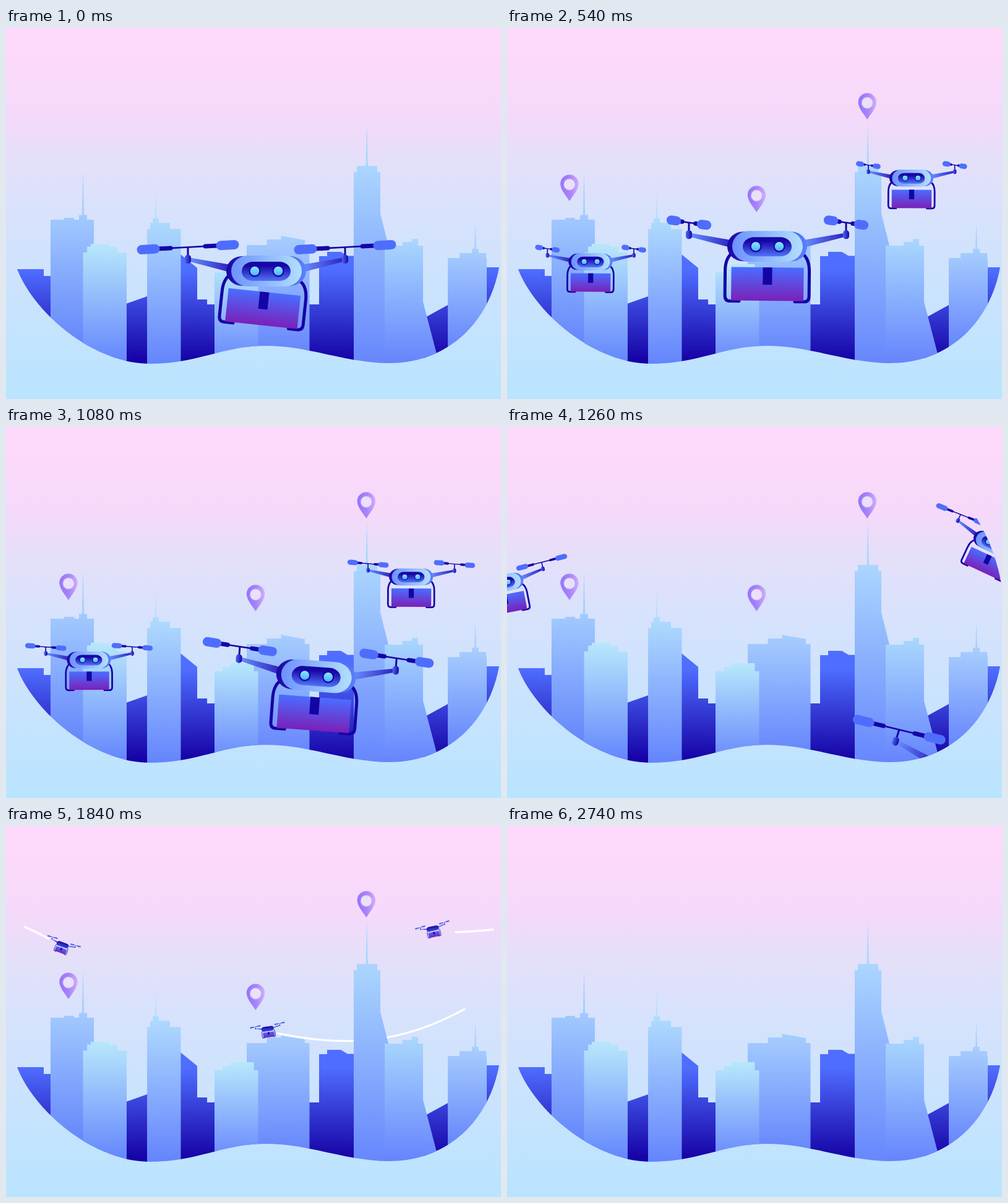
An HTML page that plays this animation: 800x600 px, repeating every 3 s.

```html
<!DOCTYPE html>
<html lang="en">
<head>
<meta charset="utf-8">
<title>Drone delivery</title>
<style>
  html, body { margin: 0; width: 100%; height: 100%; overflow: hidden; }
  svg { display: block; width: 100vw; height: 100vh; }
  .trail { fill: none; stroke: #fff; stroke-width: 3.2; stroke-linecap: round; }
  .rotor path { fill: none; stroke: #1504a5; }
  .rotor .rod { stroke-width: 2.6; }
  .rotor .grip { stroke-width: 7; stroke-linecap: round; }
  .rotor .blade { stroke: #4f6dfc; stroke-width: 15; stroke-linecap: round; }
  .frame { fill: none; stroke: #1504a5; stroke-width: 5; stroke-linecap: round; }
</style>
</head>
<body>
<svg id="stage" viewBox="0 0 800 600" preserveAspectRatio="none">
  <defs id="defs">
    <linearGradient id="sky" x2="0" y2="1">
      <stop offset="0" stop-color="#ffd9fb"/><stop offset=".24" stop-color="#f5d9fa"/>
      <stop offset=".34" stop-color="#e6dff9"/><stop offset=".5" stop-color="#d8e2fc"/>
      <stop offset="1" stop-color="#b9e4ff"/>
    </linearGradient>
    <linearGradient id="dark" gradientUnits="userSpaceOnUse" x1="0" y1="390" x2="0" y2="537">
      <stop offset="0" stop-color="#4f6eff"/><stop offset="1" stop-color="#1602a6"/>
    </linearGradient>
    <linearGradient id="shell"><stop offset="0" stop-color="#1a06a4"/><stop offset="1" stop-color="#5b82fd"/></linearGradient>
    <linearGradient id="body"><stop offset="0" stop-color="#6d92fd"/><stop offset="1" stop-color="#b2dffd"/></linearGradient>
    <linearGradient id="visor" x2="0" y2="1"><stop offset=".2" stop-color="#1805a6"/><stop offset="1" stop-color="#5173f8"/></linearGradient>
    <linearGradient id="back" x2="0" y2="1"><stop offset="0" stop-color="#1a07a6"/><stop offset="1" stop-color="#3c4be0"/></linearGradient>
    <linearGradient id="eye" x2="0" y2="1"><stop offset="0" stop-color="#8fe6ff"/><stop offset="1" stop-color="#49b4fb"/></linearGradient>
    <linearGradient id="arm"><stop offset="0" stop-color="#6a92ff"/><stop offset="1" stop-color="#2a1fbd"/></linearGradient>
    <linearGradient id="hub"><stop offset="0" stop-color="#4b69f5"/><stop offset="1" stop-color="#1706a6"/></linearGradient>
    <linearGradient id="parcel" x2="0" y2="1"><stop offset="0" stop-color="#4a6dff"/><stop offset="1" stop-color="#7a20b9"/></linearGradient>
    <linearGradient id="pin"><stop offset=".1" stop-color="#9777fb"/><stop offset=".55" stop-color="#a985fa"/><stop offset="1" stop-color="#d3aefa"/></linearGradient>
    <clipPath id="valley">
      <path d="M18 390C45 460 140 543 233 543C310 543 350 514 420 514C490 514 550 542 620 542C710 542 780 480 797 387V0H18Z"/>
    </clipPath>
    <clipPath id="air">
      <path d="M18 390C45 460 140 543 233 543C310 543 350 514 420 514C490 514 550 542 620 542C710 542 780 480 797 387C805 310 822 220 720 90L60 90C-20 200 -10 330 18 390Z"/>
    </clipPath>
  </defs>
  <rect width="800" height="600" fill="url(#sky)"/>
  <g clip-path="url(#valley)">
    <path fill="url(#dark)" d="M10 390H61V401H72V545H10ZM194 446L228 434V545H194ZM282 366L309 388V439H325V447H338V545H282ZM490 447H506V369H519V362H541L552 368.500H563V545H490ZM674 470L714 448V545H674ZM776 387H800V545H776Z"/>
    <g id="rear"></g>
  </g>
  <g id="midAir"></g>
  <g id="front" clip-path="url(#valley)"></g>
  <g id="topAir"></g>
  <g id="pins"></g>
  <g id="fleet" clip-path="url(#air)"></g>
</svg>
<script>
const $ = id => document.getElementById(id);
const clamp = v => Math.min(1, Math.max(0, v));
const span = (t, a, b) => clamp((t - a) / (b - a));
const mix = (a, b, k) => a + (b - a) * k;
const backIn = k => k * k * (2.70158 * k - 1.70158);
const backOut = (k, s) => 1 + (k - 1) ** 2 * ((s + 1) * (k - 1) + s);
const inOut = k => k < .5 ? 2 * k * k : 1 - 2 * (1 - k) ** 2;
const rad = Math.PI / 180;

function add(parent, tag, attrs, html = '') {
  const el = document.createElementNS('http://www.w3.org/2000/svg', tag);
  for (const key in attrs) el.setAttribute(key, attrs[key]);
  el.innerHTML = html;
  parent.appendChild(el);
  return el;
}
const show = (el, on) => el.setAttribute('visibility', on ? 'visible' : 'hidden');
const place = (el, x, y, turn, sx, sy = sx) =>
  el.setAttribute('transform', `translate(${x} ${y}) rotate(${turn}) scale(${sx} ${sy})`);

// Skyline: layer, roof height, top colour, bottom colour, outline
const towers = [
  ['rear', 303, '#a2cafe', '#5c7cfb', 'M72 310H94V307H110V310H118V302.500H123L124.500 232L126 302.500H131V310H142V545H72Z'],
  ['rear', 350, '#b8e7fb', '#6386fd', 'M124.500 363H131V353.500H137V349H167V353.500H180V363H195V545H124.500Z'],
  ['rear', 308, '#b0dcfd', '#6585fd', 'M228 325H233V315H237V307.500H241L242 264L243 307.500H247V315H265V325H282.500V545H228Z'],
  ['rear', 336, '#a6cefe', '#6280fc', 'M389 351H421.500V342H444.500V336L483 343V351H490.500V545H389Z'],
  ['rear', 382, '#b8e8fb', '#6787fd', 'M337 395H350V388H362V382H400.500V395H407.500V545H337Z'],
  ['front', 223, '#abd6fe', '#6787fd', 'M562 233H567V223H581.500L583 152L585 223H600V233H605V300L618 352V545H562Z'],
  ['front', 341, '#aad8fd', '#6685fd', 'M612 352H641V346H656V341H666V352H674V443L696 527V545H612Z'],
  ['front', 357, '#a8cffe', '#5c7bfb', 'M714 372H733V364H753V357H757L758.500 316L760 357H764V364H776V372H777V545H714Z']
];
towers.forEach(([layer, top, light, deep, d], i) => {
  add($('defs'), 'linearGradient',
    { id: 'tower' + i, gradientUnits: 'userSpaceOnUse', x1: 0, y1: top, x2: 0, y2: 540 },
    `<stop stop-color="${light}"/><stop offset="1" stop-color="${deep}"/>`);
  add($(layer), 'path', { d, fill: `url(#tower${i})` });
});

// Drones
const rotorParts = [['rod', 0, 30], ['grip', 28, 48], ['blade', 53, 75]];
function drone(parent, rearView) {
  const wing = x => `
    <rect x="${x - 1.5}" y="-38" width="3" height="16" fill="#1504a5"/>
    <rect x="${x - 5}" y="-26" width="10" height="14" rx="4.500" fill="url(#hub)"/>
    <g class="rotor" transform="translate(${x} -38.500)">
      ${rotorParts.map(p => `<path class="${p[0]}"/>`).join('')}</g>`;
  const eye = x => `<circle cx="${x}" r="9.600" fill="#1504a5"/><circle cx="${x}" r="7.300" fill="url(#eye)"/>`;
  const face = rearView
    ? '<rect x="-60" y="-24" width="121" height="46" rx="24" fill="url(#back)"/>'
    : `<rect x="-56" y="-25" width="114" height="50" rx="27" ry="25" fill="url(#body)"/>
       <rect x="-39" y="-15" width="79" height="31" rx="18" ry="15.500" fill="url(#visor)"/>${eye(-18)}${eye(20)}`;
  const el = add(parent, 'g', {}, `
    <g class="cargo">
      <path class="frame" d="M-54 10Q-67 18 -67 40V80Q-67 89 -59 89H-44M56 10Q69 18 69 40V80Q69 89 61 89H46"/>
      <rect x="-57" y="34" width="117" height="54" fill="url(#parcel)"/>
      <rect x="-6" y="34" width="15" height="28" fill="#1504a5"/>
    </g>
    <path fill="url(#arm)" d="M-56 -10L-126 -22V-16L-58 2Z"/>
    <path fill="url(#arm)" d="M57 -10L128 -22V-16L59 2Z"/>
    <rect x="-64" y="-24" width="129" height="48" rx="26" ry="24" fill="url(#shell)"/>
    ${face}${wing(-126)}${wing(128)}`);
  return { el, cargo: el.querySelector('.cargo'), rotors: [...el.querySelectorAll('.rotor')] };
}
function spin(d, deg) {
  const c = Math.cos(deg * rad);
  const at = r => `${(r * c).toFixed(2)} ${(-r * .054).toFixed(2)}`;
  for (const rotor of d.rotors)
    rotorParts.forEach(([, a, b], i) =>
      rotor.children[i].setAttribute('d', `M${at(-b)}L${at(-a)}M${at(a)}L${at(b)}`));
}

// Large drones: entry offset, resting point, exit offset, exit timing
const fleet = [
  { from: [-368, 80, 24], rest: [135, 378], out: [-144, -125, -11], t0: 1060, dur: 200, size: .55, sway: .8 },
  { from: [264, -136, -24], rest: [653, 243], out: [134, -53, 25], t0: 1060, dur: 200, size: .55, sway: .4 },
  { from: [0, 44, 0], rest: [420, 349], out: [323, 214, 17], t0: 900, dur: 360, size: 1, sway: 1 }
];
fleet.forEach(f => f.drone = drone($('fleet')));

function drawFleet(t) {
  fleet.forEach(f => {
    show(f.drone.el, t < 1340);
    const enter = f.size === 1 ? Math.exp(-t / 230) : (1 - span(t, 0, 600)) ** 3;
    const leave = (Math.max(0, t - f.t0) / f.dur) ** 2;
    const off = i => f.from[i] * enter + f.out[i] * leave;
    place(f.drone.el, f.rest[0] + off(0), f.rest[1] + off(1), off(2), f.size);
    const swing = 6 * Math.exp(-t / 800) * Math.cos(t / 690 * 2 * Math.PI) * (1 - span(t, 860, 1000));
    f.drone.cargo.setAttribute('transform', `rotate(${swing * f.sway})`);
    spin(f.drone, t * 1.125);
  });
}

// Distant drones following a flight path with a trail
const couriers = [
  { layer: 'midAir', tilt: -8, shift: [0, 4], fast: true,
    d: 'M760 281C640 354 540 354 423 328C414 326 406 330 405.500 337.500' },
  { layer: 'topAir', tilt: 20, shift: [0, 4],
    d: 'M18 154C100 188 190 246 101 295' },
  { layer: 'topAir', tilt: -12, shift: [2, 5],
    d: 'M800 161C760 165 730 168 692 166C620 162 530 187 548 202C553 206 562 208 573.500 209' }
];
couriers.forEach(c => {
  c.trail = add($(c.layer), 'path', { class: 'trail', d: c.d, transform: `translate(${c.shift})` });
  c.len = c.trail.getTotalLength();
  c.drone = drone($(c.layer), true);
  c.head = t => c.fast ? 1 - (1 - span(t, 1520, 2190)) ** 4.3 : inOut(span(t, 1580, 2180));
});

function drawCouriers(t) {
  const live = t >= 1520 && t < 2740;
  const k = span(t, 1520, 2180);
  const gone = backIn(span(t, 2240, 2740));
  couriers.forEach(c => {
    const pos = c.trail.getPointAtLength(c.len * c.head(t));
    const tilt = c.tilt * (1 - inOut(span(t, 1840, 2180)));
    const size = mix(.2, .11, k) * span(t, 1500, 1620) * (1 - gone);
    show(c.drone.el, live);
    place(c.drone.el, pos.x, pos.y + 18 * gone, tilt, size);
    spin(c.drone, t * 1.125 + 40);

    const tail = c.len * span(t, 1520, c.shift[0] ? 2195 : 2170) ** 4;
    const length = c.len * c.head(t - 45) - tail;
    show(c.trail, live && length > .5);
    c.trail.setAttribute('stroke-dasharray', `${Math.max(0, length)} ${c.len * 2}`);
    c.trail.setAttribute('stroke-dashoffset', -tail);
  });
}

// Map pins, anchored at their tips
const pins = [[101, 280, 142], [403.5, 298, 46], [582.3, 148, 136]].map(([x, y, start]) => {
  const el = add($('pins'), 'g', {}, `
    <path fill="url(#pin)" d="M0 0C-4 -7 -14.700 -18 -14.700 -28A14.700 14.700 0 0 1 14.700 -28C14.700 -18 4 -7 0 0Z"/>
    <circle cy="-27" r="9.200" fill="#e9e0fb" stroke="#c6a6f8" stroke-width="1"/>`);
  return { x, y, start, el, hole: el.lastElementChild };
});

function drawPins(t) {
  pins.forEach(p => {
    const k = span(t, p.start, p.start + 404);
    const size = Math.max(0, backOut(k, 2.7) - backIn(span(t, 2240, 2740)));
    const turn = Math.cos(2 * Math.PI * (1 - k) ** 2);
    show(p.el, k > 0 && t < 2740);
    place(p.el, p.x, p.y, 0, size * Math.max(.04, Math.abs(turn)), size);
    p.hole.setAttribute('opacity', turn > 0 ? turn ** 1.5 : 0);
  });
}

const begin = performance.now();
function draw() {
  const t = Math.floor((performance.now() - begin) % 3000 / 20) * 20;
  drawFleet(t);
  drawCouriers(t);
  drawPins(t);
  requestAnimationFrame(draw);
}
draw();
</script>
</body>
</html>
```
